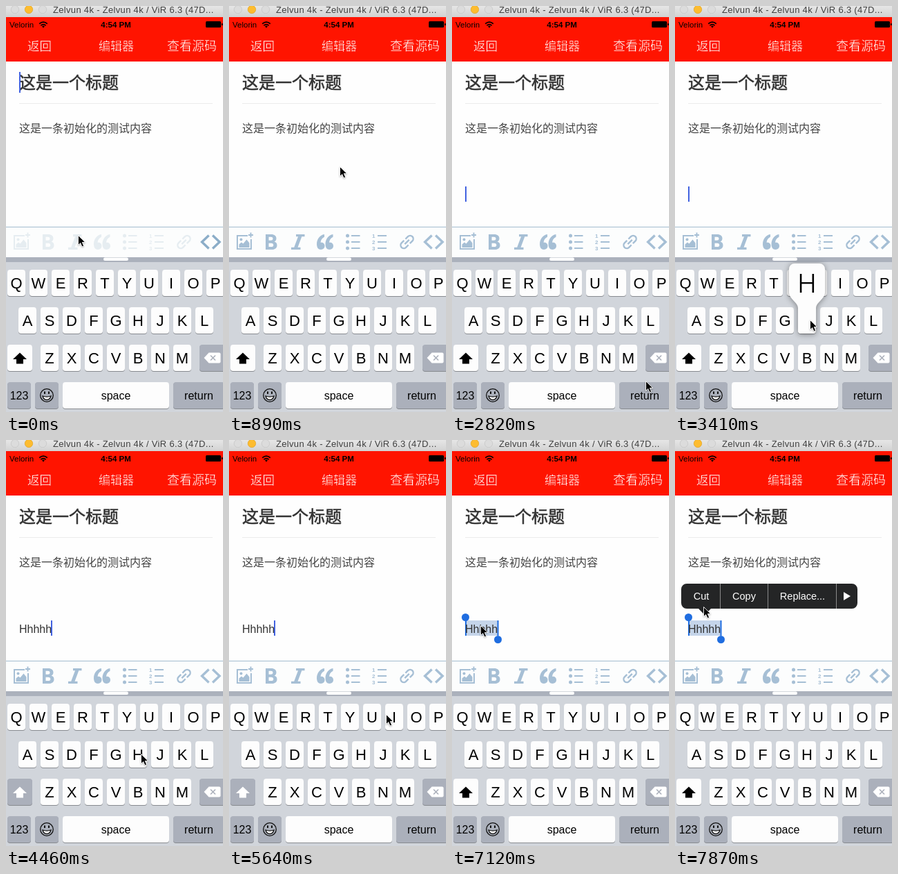
An HTML page for the animation above (8 s loop, 314 by 585 pixels).

```html
<!DOCTYPE html>
<html lang="zh-CN">
<head>
<meta charset="utf-8">
<style>
  html, body { margin: 0; width: 100%; height: 100%; overflow: hidden; background: #fefefe; }
  svg { display: block; width: 314px; height: 585px; }
  text { font-family: "Liberation Sans", Arial, sans-serif; }
  .cn { font-family: "Noto Sans CJK SC", "Noto Sans CJK", sans-serif; }
  .mid { text-anchor: middle; }
  .line { fill: none; stroke: currentColor; stroke-width: 2; }
  .icon { fill: currentColor; }
  #bubble { filter: drop-shadow(0 1px 4px rgba(0, 0, 0, .4)); }
  #bubble text { font-family: Inter, sans-serif; font-weight: 300; }
  #mouse { filter: drop-shadow(0 1px 1px rgba(0, 0, 0, .3)); }
</style>
</head>
<body>
<svg viewBox="0 0 314 585">
  <defs>
    <linearGradient id="chrome" x2="0" y2="1">
      <stop stop-color="#e6e6e6"/><stop offset="1" stop-color="#d2d2d2"/>
    </linearGradient>
  </defs>
  <rect width="314" height="585" fill="#fefefe"/>

  <!-- window bar -->
  <rect width="314" height="16" fill="url(#chrome)"/>
  <g fill="#dcdcdc" stroke="#c4c4c4" stroke-width=".7">
    <circle cx="13" cy="5" r="5.7"/>
    <circle cx="33" cy="5" r="5.7" fill="#fdbc2f" stroke="#e0a223"/>
    <circle cx="53" cy="5" r="5.7"/>
  </g>
  <text x="68" y="10" font-size="13" letter-spacing=".32" fill="#3f3f3f">Zelvun 4k - Zelvun 4k / ViR 6.3 (47D...</text>

  <!-- header -->
  <rect y="16" width="314" height="64" fill="#ff1400"/>
  <g font-size="11.5">
    <text x="5" y="31">Velorin</text>
    <text class="mid" x="159" y="31" font-weight="bold">4:54 PM</text>
    <path d="M48.2 25.6q5.8-5 11.6 0M50.4 28.1q3.6-3 7.2 0" fill="none" stroke="#000" stroke-width="1.8"/>
    <path d="M54 31.5l-2-2.2q2-1.4 4 0z"/>
    <rect x="289" y="22" width="22" height="9" rx="1.5"/>
    <rect x="312" y="25" width="1.5" height="3"/>
  </g>
  <g fill="#fff" stroke="#ff1400" stroke-width=".35">
    <text class="cn" x="31" y="63.5" font-size="17.5">返回</text>
    <text class="cn" x="134" y="63.5" font-size="17">编辑器</text>
    <text class="cn" x="233" y="63.5" font-size="18">查看源码</text>
  </g>

  <!-- document -->
  <text class="cn" x="19" y="119" font-size="24" fill="#333" stroke="#333" stroke-width=".6">这是一个标题</text>
  <path d="M19 140.5H299" stroke="#ebebeb"/>
  <text class="cn" x="19" y="182" font-size="16" fill="#444">这是一条初始化的测试内容</text>
  <g id="selection">
    <rect x="19" y="260" width="48" height="22" fill="#c5d5ea"/>
    <g fill="#1f6de0">
      <path d="M19 260h2v22h-2zM65.5 260h2v22h-2z"/>
      <circle cx="19.5" cy="255.5" r="5.5"/>
      <circle cx="66.5" cy="287.5" r="5.5"/>
    </g>
  </g>
  <text id="typed" x="19" y="278" font-size="16" fill="#333"></text>
  <rect id="caret" width="2" fill="#4262e0"/>
  <g id="menu" fill="#fff" font-size="14.5">
    <path d="M17 207H256a8 8 0 0 1 8 8v20a8 8 0 0 1-8 8H52l-9 9-9-9H17a8 8 0 0 1-8-8v-20a8 8 0 0 1 8-8z" fill="#242526"/>
    <path d="M65.5 207v36M134.5 207v36M233.5 207v36" stroke="#8a8a8a"/>
    <text class="mid" x="38" y="230">Cut</text>
    <text class="mid" x="100" y="230">Copy</text>
    <text class="mid" x="184.5" y="230">Replace...</text>
    <path d="M244 219l10 6-10 6z"/>
  </g>

  <!-- toolbar -->
  <rect y="319" width="314" height="43" fill="#fcfdfd"/>
  <path d="M0 318.5H314" stroke="#a3bccf"/>
  <g id="tools">
    <path class="line" d="M27 331H12V350H32V336M28 330h7M31.5 326.5v7"/>
    <path class="icon" d="M14.500 348v-4.500l3.500-3 2.500 2 5-6 4 5v6.500z"/>
    <circle class="icon" cx="17.5" cy="336.5" r="2"/>
    <path class="icon" fill-rule="evenodd" d="M53 329h8c5 0 7.5 2.500 7.5 6 0 2.300-1.300 4-3 4.600 2.500.7 4 2.500 4 5.100 0 4-3 6.300-8 6.300H53zM57.5 332.800v5h3c2 0 3-.8 3-2.500s-1-2.500-3-2.500zM57.5 341.700v5.400h3.500c2.200 0 3.300-1 3.300-2.700s-1.100-2.700-3.300-2.700z"/>
    <path class="icon" d="M97 329h12.5v3.200h-4.200l-5.800 15.600h4v3.200H90v-3.200h4.200l5.800-15.600h-3z"/>
    <path id="quote" class="icon" d="M138 329c-7 1-11 7.500-11 14 0 5 2 8 6 8 3.200 0 5.500-2.200 5.500-5.200s-2-5-5-5h-1c.5-4 2-6.300 5.500-8z"/>
    <use href="#quote" x="12.5"/>
    <g class="icon"><circle cx="171.5" cy="331" r="2.5"/><circle cx="171.5" cy="340" r="2.5"/><circle cx="171.5" cy="349" r="2.5"/></g>
    <path class="line" d="M177 331h12.500m-12.500 9h12.500m-12.500 9h12.500M215 331h13m-13 9h13m-13 9h13"/>
    <g class="icon" font-size="8" font-weight="bold"><text x="207" y="334">1</text><text x="207" y="343">2</text><text x="207" y="352">3</text></g>
    <path class="line" style="stroke-width: 2.4" transform="rotate(-45 257.5 340)" d="M256 335.5h-5a4.500 4.500 0 0 0 0 9h5M259 335.5h5a4.500 4.500 0 0 1 0 9h-5M253 340h9"/>
  </g>
  <path id="code" class="line" style="stroke-width: 3.4" d="M293.5 330.5L283.5 340l10 9.500M299 330.5L309 340l-10 9.500"/>

  <!-- keyboard -->
  <rect y="362" width="314" height="7" fill="#abb1bc"/>
  <rect x="141" y="362.5" width="36" height="4.500" rx="2.200" fill="#fff"/>
  <rect y="369" width="314" height="216" fill="#d1d5db"/>
  <g id="keys"></g>
  <path id="arrow" d="M20 499.5l10 9.500h-5v6.500H15V509h-5z"/>
  <path d="M286.5 507l7-7.500h15a2 2 0 0 1 2 2v11a2 2 0 0 1-2 2h-15z" fill="#fff"/>
  <path d="M296 503.5l7 7m0-7l-7 7" stroke="#abb0bb" stroke-width="1.6"/>
  <g fill="none" stroke="#111" stroke-width="1.3">
    <circle cx="59" cy="561" r="9.3"/>
    <path d="M53 562q6 2.200 12 0-1.500 5.500-6 5.500t-6-5.500z" fill="#fff"/>
    <path d="M56 555.5v3.500M62 555.5v3.500" stroke-width="2"/>
  </g>
  <g id="bubble">
    <path d="M173 371h36a8 8 0 0 1 8 8v34c0 9-13 14-13 22v33a4 4 0 0 1-4 4h-18a4 4 0 0 1-4-4v-33c0-8-13-13-13-22v-34a8 8 0 0 1 8-8z" fill="#fdfdfd"/>
    <text class="mid" x="191" y="413" font-size="37">H</text>
  </g>

  <path id="mouse" d="M.5.5v14l3.200-3 2.300 5.300 2.600-1.100-2.300-5.200h4.400z" stroke="#fff" stroke-width=".9"/>
</svg>
<script>
const $ = id => document.getElementById(id);
const GREY = '#abb0bb', WHITE = '#fdfdfd', LOOP = 8000;

function key(x, y, w, label = '', size = 22, fill = WHITE, id = `key${x}-${y}`) {
  const box = (dy, color, name) =>
    `<rect x="${x}" y="${y + dy}" width="${w}" height="38" rx="4" fill="${color}" id="${name}"/>`;
  const baseline = Math.round(y + 19 + size * .36);
  return box(1, '#888b90', id + '-shade') + box(0, fill, id) +
    `<text class="mid" x="${x + w / 2}" y="${baseline}" font-size="${size}">${label}</text>`;
}
const row = (letters, x, y) => [...letters].map((c, i) => key(x + 32 * i, y, 26, c)).join('');
$('keys').innerHTML =
  row('QWERTYUIOP', 2, 380) + row('ASDFGHJKL', 18, 434) + row('ZXCVBNM', 50, 488) +
  key(2, 488, 36, '', 16, WHITE, 'shift') + key(280, 488, 38, '', 16, GREY) +
  key(2, 542, 34, '123', 16, GREY) + key(42, 542, 34, '', 16, GREY) +
  key(82, 542, 154, 'space', 16) + key(242, 542, 74, 'return', 16, GREY, 'return');

// Pointer moves: first step, last step, step count, target, optional curve control
const moves = [
  [140, 440, 3, [160, 231]],
  [1040, 1930, 7, [296, 556]],
  [2820, 3260, 4, [195, 452]],
  [4610, 5190, 5, [284, 527]],
  [5490, 6530, 8, [43, 271], [90, 50]],
  [6670, 6671, 1, [41, 267]],
  [7570, 7870, 3, [41, 240]],
];
// Caret: time, x, y, height
const carets = [
  [0, 19, 95, 30], [290, 0, 0, 0], [1040, 210, 164, 22],
  [2220, 19, 212, 22], [2820, 19, 260, 22], [7120, 0, 0, 0],
];
const strokes = [3560, 3860, 4010, 4160, 4460];
const bubbles = [[3410, 3560], [3710, 3860], [4010, 4160]];
const returns = [[2080, 2220], [2670, 2820]];

const within = (t, spans) => spans.some(([a, b]) => t >= a && t < b);
const show = (id, on) => $(id).setAttribute('visibility', on ? 'visible' : 'hidden');
const set = (id, attrs) => Object.entries(attrs).forEach(([k, v]) => $(id).setAttribute(k, v));

function pointer(t) {
  let at = [104, 330];
  for (const [start, end, count, to, via] of moves) {
    if (t < start) break;
    const gap = (end - start) / Math.max(1, count - 1);
    const p = Math.min(1, (Math.floor((t - start + 1) / gap) + 1) / count);
    const s = p * p * (3 - 2 * p), r = 1 - s;
    at = at.map((from, i) => {
      const mid = via ? via[i] : (from + to[i]) / 2;
      return r * r * from + 2 * r * s * mid + s * s * to[i];
    });
  }
  return at;
}

function draw(t) {
  const active = t >= 890;
  $('tools').style.color = active ? '#a6bfd5' : '#e6edf1';
  $('code').style.color = active ? '#a6bfd5' : '#8badc8';

  const count = strokes.filter(s => t >= s).length;
  $('typed').textContent = 'Hhhhh'.slice(0, count);
  const [, x, y, height] = carets.filter(c => t >= c[0]).pop();
  set('caret', { x: count ? Math.round(20.7 + 8.9 * count) : x, y, height });

  const selected = t >= 7120, caps = count === 0 || selected;
  show('selection', selected);
  show('menu', t >= 7270);
  show('bubble', within(t, bubbles));
  set('shift', { fill: caps ? WHITE : GREY });
  set('arrow', { fill: caps ? '#000' : '#fff' });
  set('return', { fill: within(t, returns) ? WHITE : GREY });
  set('mouse', { transform: `translate(${pointer(t).map(Math.round)})` });
}

function tick() {
  draw(performance.now() % LOOP);
  requestAnimationFrame(tick);
}
tick();
</script>
</body>
</html>
```
